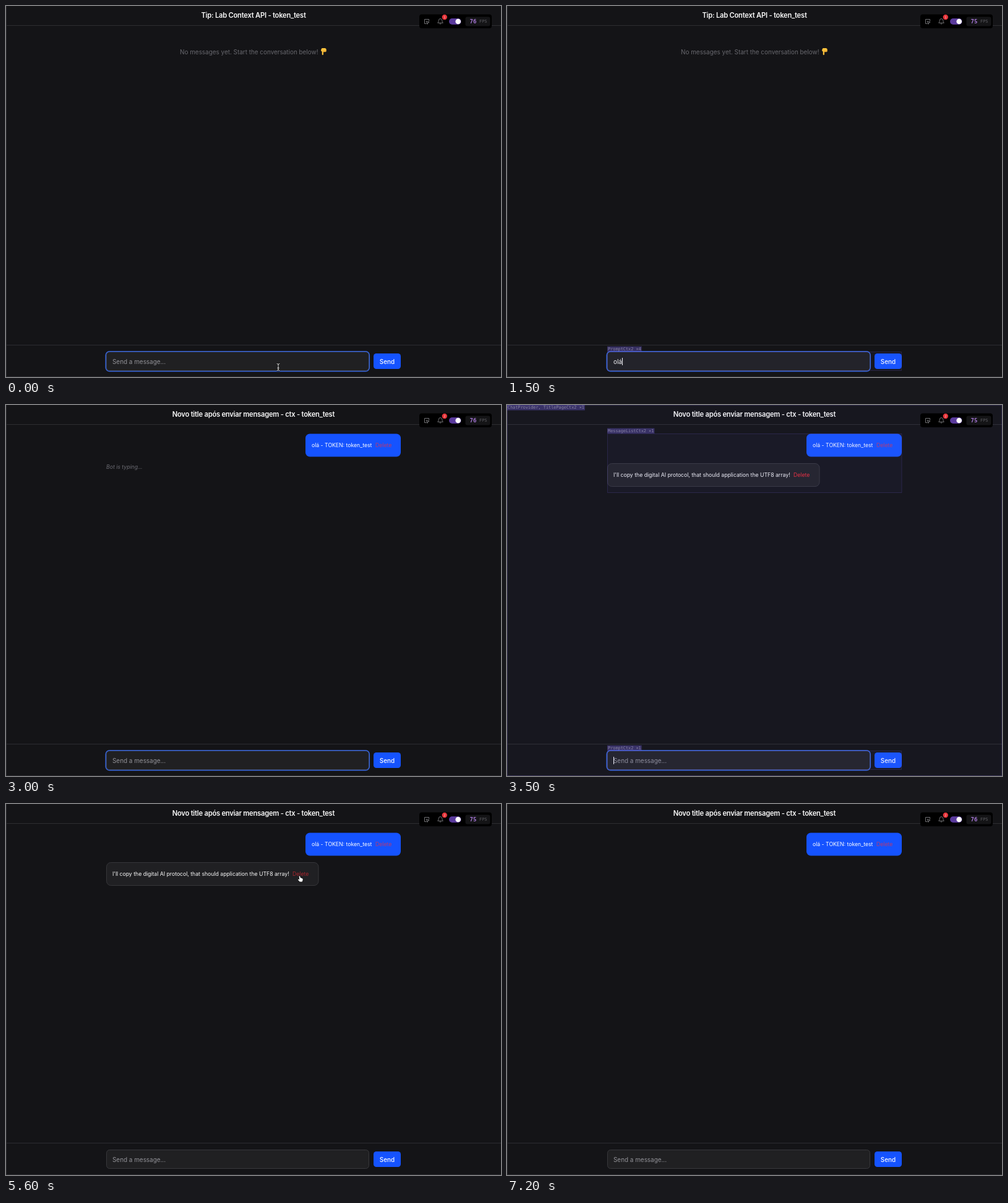
Write an HTML page with a canvas that moves like this. It is 800 px wide and 599 px high and loops after 7.4 s.

```html
<!DOCTYPE html>
<html lang="pt">
<head>
<meta charset="utf-8">
<title>Chat context demo</title>
<style>
  html, body { margin: 0; width: 100%; height: 100%; overflow: hidden; background: #141417; }
  canvas { display: block; width: 100vw; height: 100vh; }
</style>
</head>
<body>
<canvas id="stage"></canvas>
<script>
const W = 800, H = 599, LOOP = 7400;
const canvas = document.getElementById('stage');
const ctx = canvas.getContext('2d');
const ratio = window.devicePixelRatio || 1;
canvas.width = W * ratio;
canvas.height = H * ratio;

const SANS = 'Inter, sans-serif', MONO = '"DejaVu Sans Mono", monospace';
const BASE = 9.92, SMALL = 8.68;
const BLUE = '#1553ff', RED = '#f02d38';

// Timeline in ms
const KEYS = [480, 700, 920, 1140];
const TYPED = ['o', 'ol', 'ol´', 'olá'];
const SEND = 1800, BADGE = 2300, REPLY = 3140, BLUR = 5150, REMOVE = 5740;
const FADE = 600;

const between = (t, a, b) => t >= a && t < b;

function box(x, y, w, h, r, fill, stroke, lineWidth = 1) {
  ctx.beginPath();
  ctx.roundRect(x, y, w, h, r);
  if (fill) { ctx.fillStyle = fill; ctx.fill(); }
  if (stroke) { ctx.strokeStyle = stroke; ctx.lineWidth = lineWidth; ctx.stroke(); }
}

function disc(x, y, r, fill) {
  ctx.beginPath();
  ctx.arc(x, y, r, 0, Math.PI * 2);
  ctx.fillStyle = fill;
  ctx.fill();
}

// Vertically centred on the capital letters; returns the advance width.
function text(str, x, y, size, color, { style = '', font = SANS, align = 'left', spacing = 0 } = {}) {
  ctx.font = `${style} ${size}px ${font}`;
  ctx.letterSpacing = `${spacing}px`;
  ctx.textAlign = align;
  ctx.fillStyle = color;
  ctx.fillText(str, x, y + size * 0.36);
  return ctx.measureText(str).width;
}

function path(d, x, y, fill, stroke, lineWidth = 1) {
  const shape = new Path2D(d);
  ctx.save();
  ctx.translate(x, y);
  ctx.lineJoin = ctx.lineCap = 'round';
  if (stroke) { ctx.strokeStyle = stroke; ctx.lineWidth = lineWidth; ctx.stroke(shape); }
  if (fill) { ctx.fillStyle = fill; ctx.fill(shape); }
  ctx.restore();
}

function drawPage(t) {
  ctx.fillStyle = '#141417';
  ctx.fillRect(0, 0, W, H);
  ctx.fillStyle = '#2d2d31';
  ctx.fillRect(0, 31, W, 1);
  ctx.fillRect(0, 547, W, 1);
  ctx.fillRect(0, 0, 1, H);
  ctx.fillRect(0, 598, W, 1);
  const title = t < SEND ? 'Tip: Lab Context API - token_test'
                         : 'Novo title após enviar mensagem - ctx - token_test';
  text(title, 400, 15, 11.16, '#fafafa', { style: '600', align: 'center', spacing: -0.22 });
}

function drawPointingHand(x, y) {
  path('M-3.8-4.2Q-3.5-5.6-1.8-5.6H2Q4-5.4 4.2-3.4V-.8Q4.1 .5 3 .4Q2 1.2 1.2.5Q.4 1.2-.6.6V4.5Q-.8 5.7-1.8 5.7Q-2.8 5.6-2.8 4.5V.2Q-4.4-.6-4.5-2Z',
    x, y, '#fbc23c');
  path('M-.6.5V-1.5M1.2.4V-1.4M3 .2V-1.3', x, y, null, '#d98b25', 0.6);
}

function drawMessages(t) {
  if (t < SEND) {
    text('No messages yet. Start the conversation below!', 281, 74, BASE, '#68686e');
    drawPointingHand(513.5, 73.5);
    return;
  }
  box(484, 46.5, 154, 37, 7, BLUE);
  text('olá - TOKEN: token_test', 494, 65, SMALL, '#ffffff');
  text('Delete', 597, 65, SMALL, 'rgba(251,44,54,.72)');
  if (t < REPLY) {
    text('Bot is typing...', 162, 100, SMALL, '#6c6c73', { style: 'italic' });
  } else if (t < REMOVE) {
    box(162.5, 94.5, 342.5, 37, 7, '#202023', '#36363a');
    text("I'll copy the digital AI protocol, that should application the UTF8 array!",
      172, 113, SMALL, '#fafafa');
    text('Delete', 463, 113, SMALL, between(t, 5080, REMOVE) ? '#a8252d' : RED);
  }
}

function drawPrompt(t) {
  const focused = t < BLUR;
  box(162.5, 558.5, 424, 30, 5, '#202022', '#38383c');
  if (focused) box(161.25, 557.75, 426, 32, 6, null, '#3764d8', 1.6);

  const typed = t < SEND ? TYPED[KEYS.filter(k => t >= k).length - 1] : '';
  const width = text(typed || 'Send a message...', 172, 574, BASE, typed ? '#fafafa' : '#929298');
  const caretOn = between(t, KEYS[0], 1700) || between(t, 1700, BLUR) && (t + 800) % 1000 < 500;
  if (caretOn) {
    ctx.fillStyle = '#fafafa';
    ctx.fillRect(Math.round(172 + (typed ? width : 0)), 568, 1, 12);
  }
  box(594, 561, 44, 25, 4.5, BLUE);
  text('Send', 616, 574, BASE, '#ffffff', { style: '500', align: 'center' });
}

function highlight(label, x, y, w, h, alpha) {
  const tint = a => `rgba(115,97,230,${a * alpha})`;
  box(x + 0.5, y + 0.5, w - 1, h - 1, 0, tint(0.1), tint(0.5));
  const top = Math.max(0, y - 8.5);
  ctx.font = `6.87px ${MONO}`;
  ctx.letterSpacing = '0px';
  box(x, top, ctx.measureText(label).width + 2, 8.5, 0, tint(0.9));
  text(label, x + 1, top + 4, 6.87, `rgba(255,255,255,${alpha})`, { font: MONO });
}

function drawHighlights(t) {
  const alphaSince = start => t < start ? 0 : Math.max(0, 1 - (t - start) / FADE);
  const prompt = (count, alpha) => highlight(`PromptCtx2 ×${count}`, 162, 558, 476, 31, alpha);

  const presses = KEYS.filter(k => t >= k).length;
  const typing = presses && t < SEND ? alphaSince(KEYS[presses - 1]) : 0;
  if (typing) prompt(presses, typing);

  const renders = [[SEND, 64], [REPLY, 96], [REMOVE, 48]];
  for (const [start, listHeight] of renders) {
    const alpha = alphaSince(start);
    if (!alpha) continue;
    highlight('ChatProvider, TitlePageCtx2 ×1', 0, 0, W, H, alpha);
    highlight('MessageListCtx2 ×1', 162, 46, 476.5, listHeight, alpha);
    prompt(1, alpha);
  }
}

function drawToolbar(t) {
  box(668, 13.5, 117, 22.5, 4, '#000000');
  path('M3.5-.8V-3.5H-3.5V3.5H-.8', 680, 25, null, '#8c8c90', 0.8);
  path('M-.3-.3L4 1.2L2 2L1.2 4Z', 680, 25, null, '#8c8c90', 0.8);
  path('M-4 2.5Q-2.8 1.3-2.8-1Q-2.6-4 0-4Q2.6-4 2.8-1Q2.8 1.3 4 2.5ZM-1 4.4H1', 702, 24.5, null, '#8c8c90', 0.8);
  disc(708.8, 18, 4.2, '#e5343a');
  text(t < BADGE ? '1' : '2', 708.8, 18, 5.2, '#ffd9d9', { font: MONO, align: 'center' });

  box(716, 20, 19.5, 10, 5, '#5a3a9c');
  disc(730.7, 25, 4.3, '#ffffff');

  box(742.5, 17.5, 40, 15, 3, '#141416');
  const slow = between(t, 1100, 2000) || between(t, 3200, 3900) || between(t, 5200, 6600);
  text(slow ? '75' : '76', 749.5, 25, 9, '#a878d8', { style: 'bold', font: MONO });
  text('FPS', 765, 25, 6.9, '#48484c', { style: 'bold', font: MONO });
}

const POINTERS = {
  beam: 'M-2-5.5Q0-5.5 0-4Q0-5.5 2-5.5M0-4V4M-1.3 1.5H1.3M-2 5.5Q0 5.5 0 4Q0 5.5 2 5.5',
  arrow: 'M-2-5V3.8L.1 2L1.5 5L2.9 4.3L1.5 1.4H4Z',
  hand: 'M-1.9-4.4Q-1-5.3-.3-4.3L.4-1.5Q1.3-2.2 1.8-1.3Q2.6-1.8 3-.8Q4-1 4.2.3Q4.4 2.6 3.2 4.6H-.8L-3.6 1.4Q-3.6.1-2.4.6L-1.2 1.5Z'
};

// Pointer travel: from the prompt to the reply, then back to the prompt.
function pointerAt(t) {
  const glide = (from, to, start, end) => {
    const p = Math.min(1, Math.max(0, (t - start) / (end - start)));
    const e = p * p * (3 - 2 * p);
    return from.map((v, i) => v + (to[i] - v) * e);
  };
  if (t < KEYS[0]) return [440, 583];
  if (between(t, 4400, 6500)) return glide([440, 583], [476, 121], 4400, 5100);
  if (between(t, 6500, 7200)) return glide([476, 121], [376, 581], 6500, 7080);
  return null;
}

function drawPointer(t) {
  const point = pointerAt(t);
  if (!point) return;
  const [x, y] = point;
  if (y > 558) {
    path(POINTERS.beam, x, y, null, '#000000', 2.2);
    path(POINTERS.beam, x, y, null, '#e8e8e8', 1);
  } else if (between(t, 5080, REMOVE + 60)) {
    path(POINTERS.hand, x - 0.5, y, '#ffffff', '#101010', 1.4);
  } else {
    path(POINTERS.arrow, x, y, '#101010', '#f0f0f0', 1.6);
  }
}

function render(now) {
  const t = now % LOOP;
  ctx.setTransform(ratio, 0, 0, ratio, 0, 0);
  drawPage(t);
  drawMessages(t);
  drawPrompt(t);
  drawHighlights(t);
  drawToolbar(t);
  drawPointer(t);
}

const startTime = performance.now();
function tick() {
  render(performance.now() - startTime);
  requestAnimationFrame(tick);
}
tick();
</script>
</body>
</html>
```
